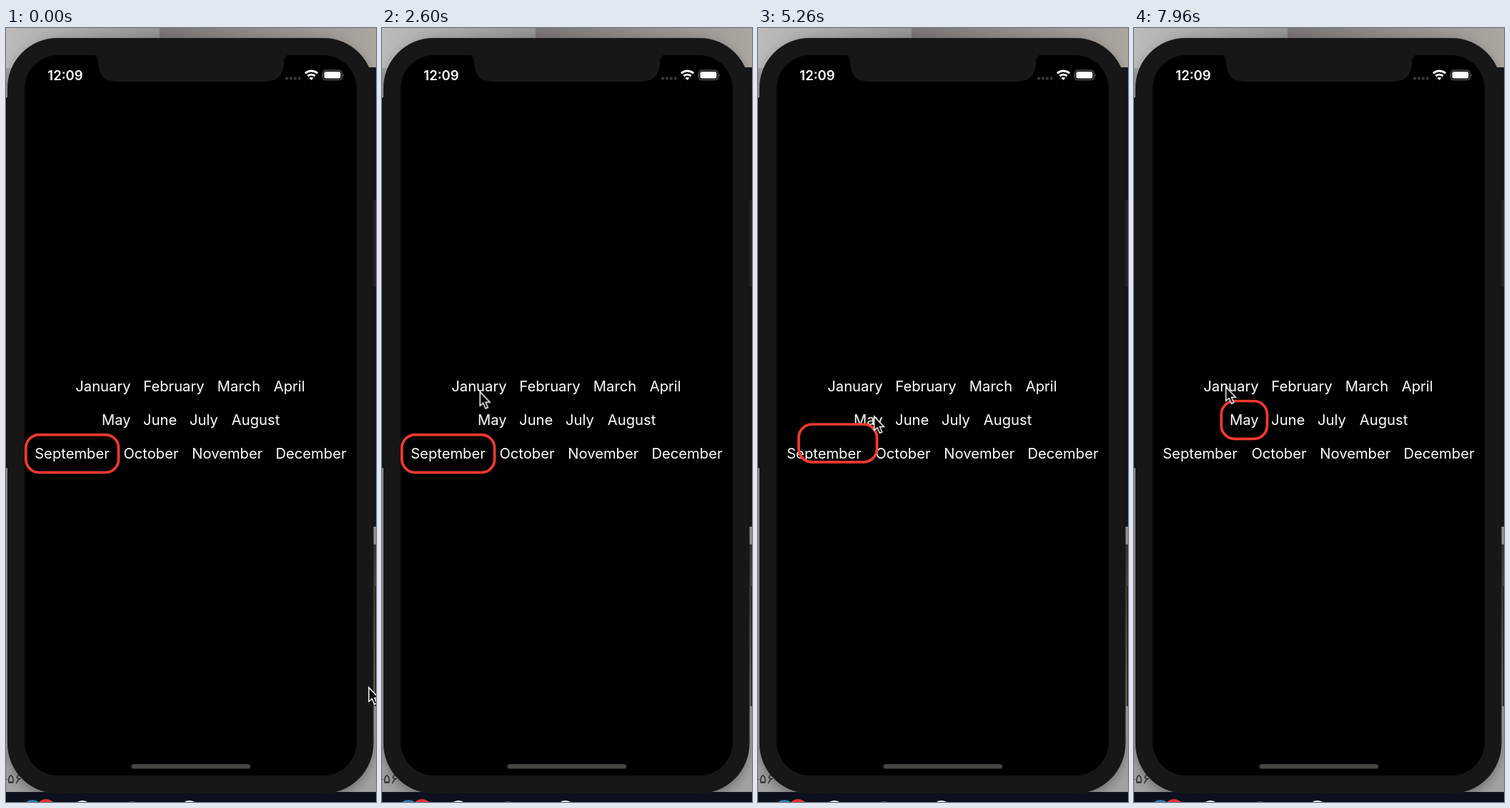
An HTML page for the animation above (8000 ms loop, 518 by 1082 pixels).

```html
<!DOCTYPE html>
<html lang="en">
<head>
<meta charset="utf-8">
<title>Month picker</title>
<style>
  html, body { margin: 0; width: 100%; height: 100%; overflow: hidden; background: #000; }
  svg { display: block; width: 518px; height: 1082px; }

  .months text { font: 400 20.2px Inter, Roboto, sans-serif; fill: #fff; text-anchor: middle; }
  .clock { font: 600 18.5px Inter, Roboto, sans-serif; fill: #fff; text-anchor: middle; }
  .note { font: 19px "DejaVu Sans", sans-serif; fill: #333; }

  .ring {
    fill: none; stroke: #f63a2f; stroke-width: 3.7;
    height: 52.8px;
    animation: ring 8s infinite;
  }
  @keyframes ring {
    0%, 60.94% { x: 27.8px; y: 568.6px; width: 129.8px; animation-timing-function: cubic-bezier(.42, 0, .58, 1); }
    73.44%, 100% { x: 122.2px; y: 521.5px; width: 64.2px; }
  }

  .cursor {
    fill: #000; stroke: #fff; stroke-width: 1.5; stroke-linejoin: miter;
    animation: cursor 8s ease-in-out infinite;
  }
  @keyframes cursor {
    0%, 1% { transform: translate(508px, 922px); }
    14%, 24% { transform: translate(131.4px, 564px); }
    31%, 41% { transform: translate(137.2px, 508.6px); }
    50%, 87% { transform: translate(162.6px, 543px); }
    97%, 100% { transform: translate(128.6px, 501.8px); }
  }
</style>
</head>
<body>
<svg viewBox="0 0 518 1082">
  <defs>
    <linearGradient id="bar">
      <stop offset="0" stop-color="#bcbcbc"/>
      <stop offset=".415" stop-color="#949494"/>
      <stop offset=".415" stop-color="#7b7673"/>
      <stop offset="1" stop-color="#aca6a1"/>
    </linearGradient>
    <linearGradient id="side" x2="0" y2="1">
      <stop offset="0" stop-color="#3a3838"/>
      <stop offset="1" stop-color="#8a8280"/>
    </linearGradient>
    <filter id="blur" x="-10%" y="-10%" width="120%" height="120%">
      <feGaussianBlur stdDeviation="9"/>
    </filter>
  </defs>

  <!-- desktop behind the phone -->
  <rect width="518" height="1082" fill="#a2a2a2"/>
  <rect width="518" height="56" fill="url(#bar)"/>
  <rect y="97" width="6" height="518" fill="#171a1c"/>
  <rect x="508" y="55" width="10" height="642" fill="#17191d"/>
  <rect x="508" y="722" width="10" height="226" fill="url(#side)"/>
  <rect x="516.5" y="780" width="1.5" height="168" fill="#24241a"/>
  <rect x="4" y="20" width="508" height="1056" rx="72" fill="#000" opacity=".38" filter="url(#blur)"/>
  <text class="note" x="-5" y="1056">-۵۶</text>
  <rect y="1068" width="518" height="14" fill="#0c111d"/>
  <circle cx="37" cy="1094" r="15" fill="#2b7fa8"/>
  <circle cx="56" cy="1092" r="14" fill="#e0303a"/>
  <circle cx="107" cy="1094" r="14" fill="#e6e6ea"/>
  <circle cx="176" cy="1095" r="14" fill="#285a70"/>
  <circle cx="257" cy="1094" r="14" fill="#e6e6ea"/>

  <!-- phone -->
  <rect x="512" y="240" width="6" height="122" fill="#24242b"/>
  <rect x="2" y="14" width="512.5" height="1056" rx="70" fill="#171717"/>
  <rect x="26" y="38" width="465" height="1007" rx="47" fill="#000"/>
  <path d="M121 37.5Q129 38 129 47V49Q130 75 156 75H362Q388 75 389 49V47Q389 38 397 37.5Z" fill="#171717"/>

  <!-- status bar -->
  <text class="clock" x="83" y="72.5">12:09</text>
  <path d="M393 70.5h.01m5.9 0h.01m5.9 0h.01m5.9 0h.01" stroke="#353535" stroke-width="4.4" stroke-linecap="round"/>
  <g fill="none" stroke="#fff" stroke-width="2.8">
    <path d="M418.9 63.4A12.6 12.6 0 0 1 436.1 63.4M422.4 67.1A7.5 7.5 0 0 1 432.6 67.1"/>
    <path d="M427.5 73L424.6 69.8Q427.5 67.6 430.4 69.8Z" fill="#fff" stroke="none"/>
  </g>
  <rect x="443.6" y="59.1" width="26.6" height="13.4" rx="4" fill="none" stroke="#666" stroke-width="1.2"/>
  <rect x="445.5" y="61" width="22.8" height="9.6" rx="2.4" fill="#fff"/>
  <path d="M471.8 63.6Q474 65.8 471.8 68Z" fill="#666"/>

  <g class="months">
    <text x="136" y="508">January</text>
    <text x="235" y="508">February</text>
    <text x="326" y="508">March</text>
    <text x="396.7" y="508">April</text>
    <text x="154.3" y="555">May</text>
    <text x="215.7" y="555">June</text>
    <text x="277" y="555">July</text>
    <text x="349.6" y="555">August</text>
    <text x="92.5" y="602">September</text>
    <text x="203" y="602">October</text>
    <text x="309.8" y="602">November</text>
    <text x="427" y="602">December</text>
  </g>

  <rect class="ring" rx="18.6"/>
  <rect x="175.5" y="1029" width="166.5" height="6.4" rx="3.2" fill="#474542"/>
  <path class="cursor" d="M0 0V19.5L4.4 15.8L7.8 23.2L11 21.8L7.9 14.6H13.8Z"/>
</svg>
</body>
</html>
```
